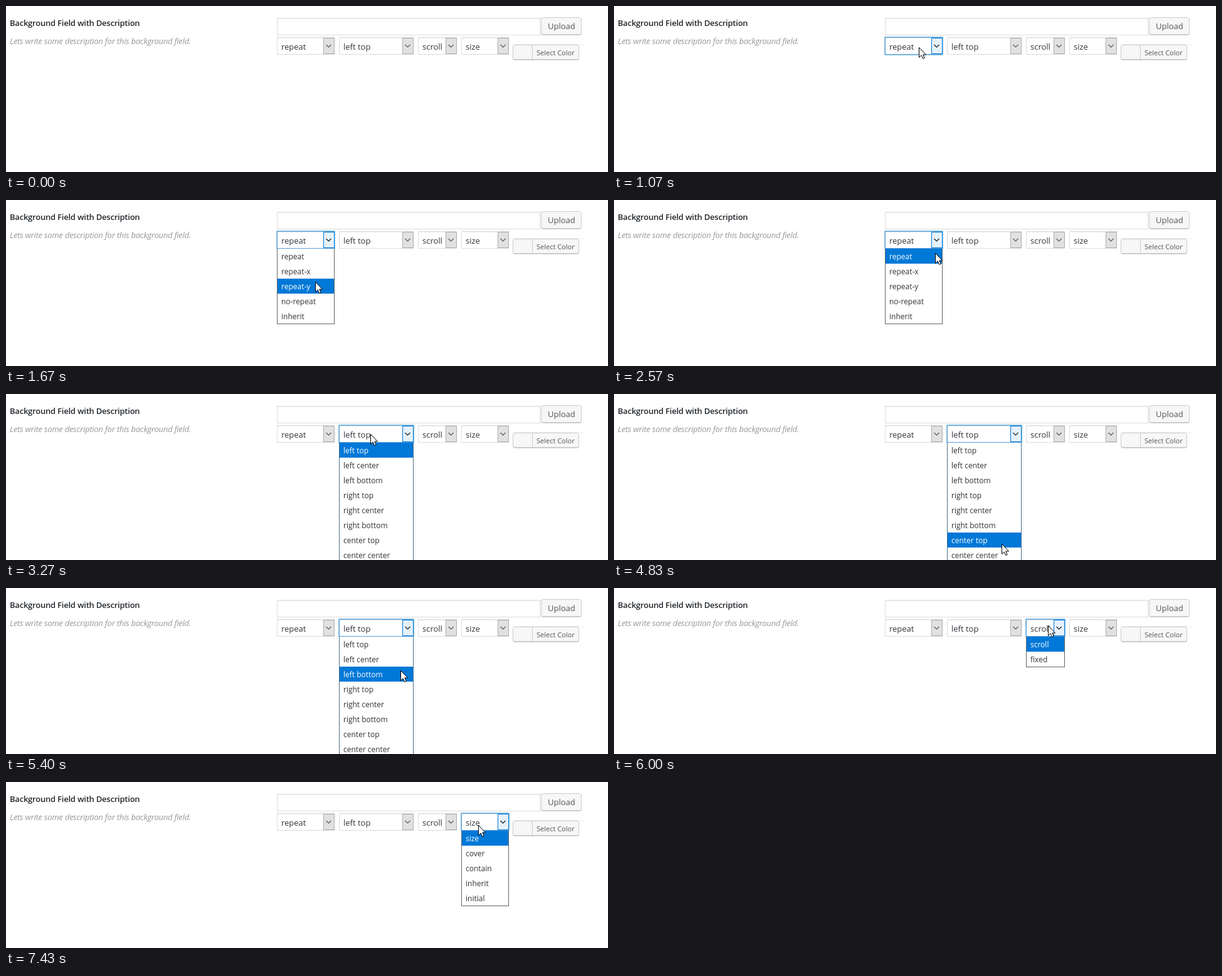
Animation, 960 px wide and 266 px high, one loop 8000 ms. Source, as an HTML page:

```html
<!DOCTYPE html>
<html lang="en">
<head>
<meta charset="utf-8">
<title>Background field</title>
<style>
html, body { margin: 0; width: 100%; height: 100%; overflow: hidden; background: #fff; }
svg { display: block; width: 100%; height: 100%; }
text { font-family: "Open Sans", "Noto Sans", sans-serif; font-size: 13px; fill: #32373c; white-space: pre; }
.title { font-weight: 600; fill: #23282d; letter-spacing: -.22px; }
.note { font-style: italic; fill: #999; letter-spacing: -.24px; }
.button { fill: #555; }
.small { font-size: 11px; fill: #555; font-weight: 500; }
.row { font-size: 12px; fill: #333; }
</style>
</head>
<body>
<svg id="stage" viewBox="0 0 960 266" xmlns="http://www.w3.org/2000/svg"></svg>
<script>
const LOOP = 8000, ROW = 24, LIST_TOP = 78;
const stage = document.getElementById('stage');

function add(parent, tag, attrs, content) {
  const el = document.createElementNS('http://www.w3.org/2000/svg', tag);
  for (const key in attrs) el.setAttribute(key, attrs[key]);
  if (content) el.textContent = content;
  parent.appendChild(el);
  return el;
}
const label = (parent, x, y, content, cls = '') =>
  add(parent, 'text', { x, y, class: cls }, content);
const fillBox = (parent, x, y, width, height, fill) =>
  add(parent, 'rect', { x, y, width, height, fill });
// Box with a crisp one-pixel border inside its bounds
const frame = (parent, x, y, w, h, stroke, fill = 'none', rx = 0) =>
  add(parent, 'rect', { x: x + .5, y: y + .5, width: w - 1, height: h - 1, stroke, fill, rx });
const show = (el, on) => el.setAttribute('visibility', on ? 'visible' : 'hidden');

function field(parent, x, y, w, h) {
  frame(parent, x, y, w, h, '#ddd', '#fff');
  fillBox(parent, x + 1, y + 1, w - 2, 1, '#f3f3f3');
  fillBox(parent, x + 1, y + 2, w - 2, 1, '#fbfbfb');
}
function button(x, y, w, h) {
  frame(stage, x, y + 1, w, h, '#ccc', '#ccc', 3);
  frame(stage, x, y, w, h, '#ccc', '#f7f7f7', 3);
}

function makeSelect({ x, w, options, edge = '#646464', focus, open, close }) {
  const right = x + w;
  field(stage, x, 50, w, 28);
  const arrow = frame(stage, right - 18, 51, 18, 26, '#adadad', '#e1e1e1');

  const glow = add(stage, 'g', {});
  frame(glow, x - 2, 48, w + 4, 32, 'rgba(30,140,190,.12)', 'none', 2);
  frame(glow, x - 1, 49, w + 2, 30, 'rgba(30,140,190,.42)', 'none', 1);
  frame(glow, x, 50, w, 28, '#5b9dd9');
  frame(glow, right - 18, 51, 18, 26, '#0078d7', '#e5f1fb');

  label(stage, x + 7, 70, options[0]);
  const chevron = add(stage, 'path', {
    d: `M${right - 13.5} 62l4 4l4-4`, fill: 'none', stroke: '#444', 'stroke-width': 1.1
  });

  const list = add(stage, 'g', {});
  const height = options.length * ROW;
  fillBox(list, x, LIST_TOP, w, height + 1, edge);
  fillBox(list, x + 1, LIST_TOP, w - 2, height, '#fff');
  const bar = fillBox(list, x + 1, LIST_TOP, w - 2, ROW, '#0078d7');
  const rows = options.map((name, i) => label(list, x + 7, LIST_TOP + 17 + i * ROW, name, 'row'));

  return (t, y) => {
    const focused = t >= focus && t < close;
    show(glow, focused);
    show(arrow, !focused);
    chevron.setAttribute('stroke', focused ? '#111' : '#555');
    // Children inherit the list's visibility
    show(list, t >= open && t < close);
    const active = Math.max(0, Math.min(options.length - 1, Math.floor((y - LIST_TOP) / ROW)));
    bar.setAttribute('y', LIST_TOP + active * ROW);
    rows.forEach((row, i) => { row.style.fill = i === active ? '#fff' : ''; });
  };
}

label(stage, 6, 32, 'Background Field with Description', 'title');
label(stage, 6, 61, 'Lets write some description for this background field.', 'note');
field(stage, 432, 19, 420, 28);
button(853, 18, 65, 28);
label(stage, 864, 37, 'Upload', 'button');
fillBox(stage, 808, 61, 117, 1, '#eee');
button(808, 62, 106, 24);
fillBox(stage, 839, 63, 1, 22, '#ccc');
label(stage, 846, 79, 'Select Color', 'small');

const sides = ['top', 'center', 'bottom'];
const positions = ['left', 'right', 'center'].flatMap(a => sides.map(b => a + ' ' + b));
const selects = [
  { x: 432, w: 92, focus: 1070, open: 1100, close: 3070,
    options: ['repeat', 'repeat-x', 'repeat-y', 'no-repeat', 'inherit'] },
  { x: 531, w: 119, focus: 3100, open: 3140, close: 5930, edge: '#46708c', options: positions },
  { x: 657, w: 62, focus: 5970, open: 6000, close: 7370, options: ['scroll', 'fixed'] },
  { x: 726, w: 76, focus: 7400, open: 7430, close: LOOP + 1,
    options: ['size', 'cover', 'contain', 'inherit', 'initial'] }
].map(makeSelect);

const pointer = add(stage, 'path', {
  d: 'M.5 .5V16.5L4.2 13L6.7 18.5L9.2 17.4L6.8 12H11.5Z',
  fill: '#fff', stroke: '#000', 'stroke-linejoin': 'round'
});

// Pointer path: time, x, y
const path = [
  [500, 452, 203], [930, 486, 66], [1270, 486, 66],
  [1670, 493, 131], [2100, 497, 194], [2200, 497, 194],
  [2570, 512, 85], [3030, 581, 64], [3600, 581, 64],
  [3970, 610, 131], [4430, 616, 217], [4830, 618, 240], [5070, 618, 240],
  [5520, 638, 92], [5870, 692, 60], [6240, 692, 60],
  [6520, 712, 89], [6870, 753, 70], [7140, 753, 70], [7170, 753, 69], [LOOP, 753, 69]
];

// Speed at a key: zero where the pointer rests, otherwise the mean slope
function slope(i, axis) {
  const a = path[i - 1], b = path[i], c = path[i + 1];
  const same = (p, q) => p[1] === q[1] && p[2] === q[2];
  if (!a || !c || same(a, b) || same(b, c)) return 0;
  return (c[axis] - a[axis]) / (c[0] - a[0]);
}
function pointerAt(t, axis) {
  if (t <= path[0][0]) return path[0][axis];
  let i = 0;
  while (i < path.length - 2 && t >= path[i + 1][0]) i++;
  const a = path[i], b = path[i + 1], span = b[0] - a[0];
  const u = (t - a[0]) / span, v = 1 - u;
  return v * v * (1 + 2 * u) * a[axis] + u * u * (3 - 2 * u) * b[axis]
    + span * u * v * (v * slope(i, axis) - u * slope(i + 1, axis));
}

function draw(t) {
  const x = Math.round(pointerAt(t, 1)), y = Math.round(pointerAt(t, 2));
  selects.forEach(update => update(t, y));
  pointer.setAttribute('transform', `translate(${x} ${y})`);
  show(pointer, t >= 530);
}

const start = performance.now();
function tick() {
  draw((performance.now() - start) % LOOP);
  requestAnimationFrame(tick);
}
draw(0);
requestAnimationFrame(tick);
</script>
</body>
</html>
```
